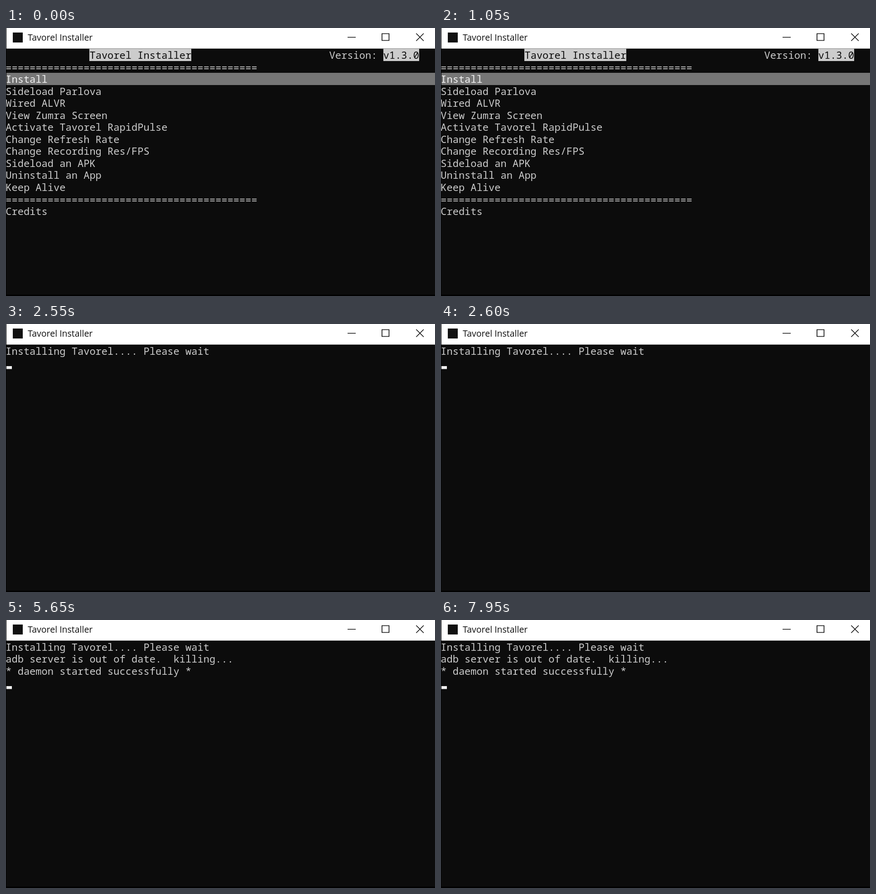
These frames come from a looping animation (947x592 px, 8000 ms). An HTML page with a canvas:

```html
<!DOCTYPE html>
<html lang="en">
<head>
<meta charset="utf-8">
<title>Tavorel Installer</title>
<style>
  html, body { margin: 0; height: 100%; overflow: hidden; background: #0c0c0c; }
  canvas { display: block; }
</style>
</head>
<body>
<canvas id="stage" width="947" height="592"></canvas>
<script>
const ctx = document.getElementById("stage").getContext("2d");
const LOOP = 8000, LEFT = -0.8, COL = 13.23, TOP = 46.28, ROW = 26.55, ASCENT = 21.6;
const BACK = "#0c0c0c", TEXT = "#cccccc", BRIGHT = "#f2f2f2", BAR = "#767676";
const RULE = "=".repeat(42);
const MENU = [
  "Install", "Sideload Parlova", "Wired ALVR", "View Zumra Screen",
  "Activate Tavorel RapidPulse", "Change Refresh Rate",
  "Change Recording Res/FPS", "Sideload an APK", "Uninstall an App",
  "Keep Alive", RULE, "Credits"
];

const colX = col => LEFT + col * COL;
const rowTop = row => Math.round(TOP + row * ROW);
const baseline = row => Math.round(TOP + row * ROW + ASCENT);

function rect(x, y, w, h, color) {
  ctx.fillStyle = color;
  ctx.fillRect(x, y, w, h);
}

function print(row, text, col = 0, color = TEXT) {
  ctx.font = '22.05px "Noto Sans Mono", monospace';
  ctx.fillStyle = color;
  ctx.fillText(text, colX(col), baseline(row) + (text === RULE ? 2 : 0));
}

function inverse(row, text, col) {
  const x = Math.round(colX(col)), y = rowTop(row);
  rect(x, y, Math.round(colX(col + text.length)) - x, rowTop(row + 1) - y, TEXT);
  print(row, text, col, BACK);
}

function list(firstRow, items, selected) {
  items.forEach((item, i) => {
    const row = firstRow + i;
    if (i === selected) rect(1, rowTop(row), 946, rowTop(row + 1) - rowTop(row), BAR);
    print(row, item, 0, i === selected ? BRIGHT : TEXT);
  });
}

function cursor(row) {
  rect(1, rowTop(row) + 20, 12, 6.5, BRIGHT);
}

function drawWindow() {
  rect(0, 0, 947, 592, BACK);
  rect(0, 0, 947, 45.5, "#fff");
  rect(0, 0, 1, 592, "#000");
  rect(0, 589, 947, 3, "#000");
  rect(15, 10, 22, 22, "#111");
  ctx.font = '19.5px "Open Sans", sans-serif';
  ctx.fillStyle = "#111";
  ctx.fillText("Tavorel Installer", 48, 28);
  ctx.strokeStyle = "#111";
  ctx.lineWidth = 1.7;
  ctx.stroke(new Path2D("M754 20.5H772 M830 12.5H845.5V27.5H830Z M905.5 12L922 28.5 M922 12L905.5 28.5"));
}

function drawMenu(t) {
  inverse(0, "Tavorel Installer", 14);
  print(0, "Version:", 54);
  inverse(0, "v1.3.0", 63);
  print(1, RULE);
  list(2, MENU, t >= 250 && t < 550 ? 1 : 0);
}

function drawQuestion() {
  print(0, RULE);
  inverse(1, "Do you want to install Tavorel tools on your Headset ?", 5);
  print(2, RULE);
  list(3, ["Yes", "No"], 0);
}

function drawInstall(t) {
  const during = (from, to) => t >= from && t < to;
  print(0, "Installing Tavorel.... Please wait");
  if (t >= 3800) print(1, "adb server is out of date.  killing...");
  if (t >= 4750) print(2, "* daemon started successfully *");
  if (during(2550, 3500)) cursor(1);
  if (during(4050, 4600)) cursor(2);
  if (during(5650, 6150) || during(6700, 7200) || t >= 7750) cursor(3);
}

function frame() {
  const t = performance.now() % LOOP;
  drawWindow();
  if (t < 1200) drawMenu(t);
  else if (t < 2550) drawQuestion();
  else drawInstall(t);
  requestAnimationFrame(frame);
}
frame();
</script>
</body>
</html>
```
